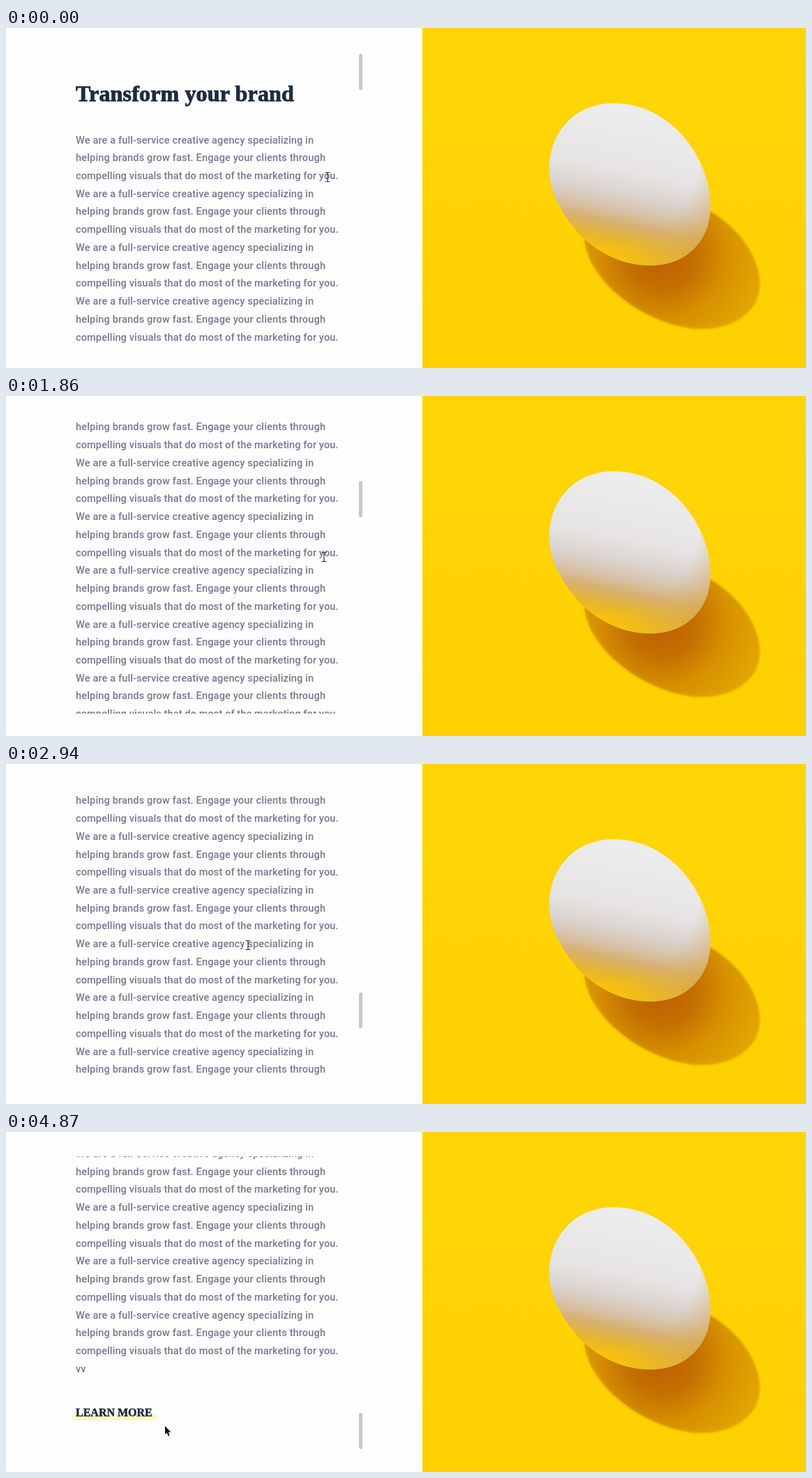
These frames come from a looping animation (1147x488 px, 5080 ms). An HTML page:

```html
<!DOCTYPE html>
<html lang="en">
<head>
<meta charset="utf-8">
<title>Transform your brand</title>
<style>
  html, body { margin: 0; width: 100%; height: 100%; overflow: hidden; background: #fefefe; }
  #stage { position: relative; width: 1147px; height: 488px; overflow: hidden; }
  #view { position: absolute; left: 90px; top: 35px; width: 412px; height: 421px; overflow: hidden; }
  #content { position: absolute; left: 10px; top: 0; width: 400px; white-space: nowrap; }
  h1 { position: absolute; margin: 0; left: 0; top: 38.7px; color: #1f2b3d;
       font: 700 32px/40px "Liberation Serif", serif; letter-spacing: .15px;
       -webkit-text-stroke: .9px #1f2b3d; }
  #lines { position: absolute; left: 0; top: 113.5px; color: #757a91;
           font: 500 14.6px/25.735px Roboto, sans-serif; }
  #lines div { height: 25.735px; }
  #lines div:nth-child(3n+1) { letter-spacing: .105px; }
  #lines div:nth-child(3n+2) { letter-spacing: .125px; }
  #lines div:nth-child(3n) { letter-spacing: .065px; }
  #link { position: absolute; left: 0; top: 2957.5px; color: #1f2b3d;
          font: 700 16px/20px "Liberation Serif", serif; -webkit-text-stroke: .5px #1f2b3d; }
  #mark { position: absolute; left: -6px; top: 12.5px; width: 122px; height: 8.5px;
          border-radius: 3px; background: #ffd200; }
  #link span { position: relative; }
  #thumb { position: absolute; left: 506px; top: 37px; width: 5px; height: 51.5px;
           border-radius: 2.5px; background: #c9c9c9; }
  svg { position: absolute; left: 0; top: 0; }
</style>
</head>
<body>
<div id="stage">
  <div id="view">
    <div id="content">
      <h1>Transform your brand</h1>
      <div id="lines"></div>
      <div id="link"><div id="mark"></div><span>LEARN MORE</span></div>
    </div>
  </div>
  <div id="thumb"></div>
  <svg width="1147" height="488" viewBox="0 0 1147 488">
    <defs>
      <linearGradient id="wall" x1="0" y1="0" x2="0" y2="1">
        <stop offset="0" stop-color="#ffd505"/>
        <stop offset="1" stop-color="#ffd002"/>
      </linearGradient>
      <radialGradient id="shade" gradientUnits="userSpaceOnUse" cx="940" cy="325" r="148">
        <stop offset="0" stop-color="#bb5e00"/>
        <stop offset=".35" stop-color="#c57100"/>
        <stop offset=".65" stop-color="#d79200"/>
        <stop offset="1" stop-color="#e3a600"/>
      </radialGradient>
      <linearGradient id="shell" gradientUnits="userSpaceOnUse" x1="925" y1="122" x2="882" y2="335">
        <stop offset="0" stop-color="#edecec"/>
        <stop offset=".4" stop-color="#e7e5e4"/>
        <stop offset=".55" stop-color="#dcd5d0"/>
        <stop offset=".66" stop-color="#d6c4ae"/>
        <stop offset=".76" stop-color="#d8b070"/>
        <stop offset=".87" stop-color="#e9b62c"/>
        <stop offset=".97" stop-color="#fcc600"/>
      </linearGradient>
      <radialGradient id="rim" gradientUnits="userSpaceOnUse" cx="850" cy="170" r="215">
        <stop offset=".68" stop-color="#d9ab62" stop-opacity="0"/>
        <stop offset=".95" stop-color="#dca544" stop-opacity=".7"/>
      </radialGradient>
      <filter id="soft"><feGaussianBlur stdDeviation="1.4"/></filter>
      <filter id="edge"><feGaussianBlur stdDeviation=".5"/></filter>
      <path id="egg" d="M871 108C925 108 965 141 987 177C1002 203 1010 228 1010 256C1010 306 975 341 924 341C880 341 838 318 812 284C792 258 779 232 779 203C779 150 815 108 871 108Z"/>
    </defs>
    <rect x="597" width="550" height="488" fill="url(#wall)"/>
    <path filter="url(#soft)" fill="url(#shade)" d="M1006 261C1045 282 1081 325 1081 368C1081 408 1042 432 998 432C930 432 836 372 829 303L920 300Z"/>
    <g filter="url(#edge)">
      <use href="#egg" fill="url(#shell)"/>
      <use href="#egg" fill="url(#rim)"/>
    </g>
    <g id="cursor">
      <path id="arrow" transform="scale(.92)" d="M0 0V12.8L2.9 10.2L5 15.6L7.3 14.6L5.1 9.4H9Z" stroke="#fff" stroke-width="1" paint-order="stroke"/>
      <path id="beam" d="M-3.5 -6.5H-1Q0 -6.5 0 -5.5Q0 -6.5 1 -6.5H3.5M0 -5.5V5.5M-3.5 6.5H-1Q0 6.5 0 5.5Q0 6.5 1 6.5H3.5" fill="none" stroke="#333" stroke-width="1.2"/>
      <path id="hand" d="M-1.2 1Q0 -.6 1.2 1V6L5.5 7Q7.5 7.6 7.2 10L6.2 15.5H-1.5L-5 10.3Q-5.4 8.3 -3.2 8.8L-1.2 10.3Z" fill="#fff" stroke="#111" stroke-width="1.1" stroke-linejoin="round"/>
    </g>
  </svg>
</div>
<script>
const LOOP = 5080, PITCH = 25.734, TRAVEL = 2600;
const $ = id => document.getElementById(id);

const copy = [
  "We are a full-service creative agency specializing in",
  "helping brands grow fast. Engage your clients through",
  "compelling visuals that do most of the marketing for you."
];
const lineEnds = [441, 458, 476];
for (let i = 0; i <= 108; i++) {
  const row = document.createElement("div");
  row.textContent = i < 108 ? copy[i % 3] : "vv";
  $("lines").append(row);
}

// Each key: time, value
const scrollKeys = [[1310, 0], [1400, 108], [1550, 319], [1860, 605], [1920, 612],
  [2150, 612], [2670, 1340], [3230, TRAVEL]];
const xKeys = [[310, 461], [500, 491], [840, 491], [1190, 456], [2180, 456], [2670, 390],
  [3260, 277], [3440, 182], [3770, 168], [4240, 168], [4780, 228]];
const yKeys = [[310, 214], [500, 213], [840, 213], [1190, 231], [2180, 231], [2670, 251],
  [3260, 275], [3440, 341], [3770, 407], [4240, 407], [4780, 422]];
const markKeys = [[3680, .21], [4060, .9], [4380, .9], [4870, .21]];

// Monotone cubic interpolation, holding both ends
function track(keys, t) {
  const last = keys.length - 1;
  if (t <= keys[0][0]) return keys[0][1];
  if (t >= keys[last][0]) return keys[last][1];
  const slope = i => (keys[i + 1][1] - keys[i][1]) / (keys[i + 1][0] - keys[i][0]);
  const tangent = i => {
    if (i === 0 || i === last) return 0;
    const a = slope(i - 1), b = slope(i);
    return a * b <= 0 ? 0 : 2 * a * b / (a + b);
  };
  const i = keys.findIndex(k => k[0] > t) - 1;
  const [t0, v0] = keys[i], [t1, v1] = keys[i + 1];
  const d = t1 - t0, u = (t - t0) / d, w = 1 - u;
  return v0 * (1 + 2 * u) * w * w + d * tangent(i) * u * w * w
       + v1 * u * u * (3 - 2 * u) - d * tangent(i + 1) * u * u * w;
}

function cursorKind(x, y, scroll) {
  const linkY = 2992 - scroll;
  if (x > 100 && x < 212 && y > linkY && y < linkY + 22) return "hand";
  const line = Math.floor((y + scroll - 148.5) / PITCH);
  if (line < 0 || line > 108) return "arrow";
  const end = line < 108 ? lineEnds[line % 3] : 115;
  return x >= 100 && x <= end ? "beam" : "arrow";
}

function draw() {
  const t = performance.now() % LOOP;
  const scroll = track(scrollKeys, t);
  const x = Math.round(track(xKeys, t)), y = Math.round(track(yKeys, t));
  const kind = cursorKind(x, y, scroll);
  $("content").style.top = -Math.round(scroll) + "px";
  $("thumb").style.top = 37 + scroll * 366 / TRAVEL + "px";
  $("mark").style.opacity = track(markKeys, t);
  $("cursor").setAttribute("transform", `translate(${x} ${y})`);
  for (const id of ["arrow", "beam", "hand"])
    $(id).style.display = id === kind ? "" : "none";
  requestAnimationFrame(draw);
}
draw();
</script>
</body>
</html>
```
